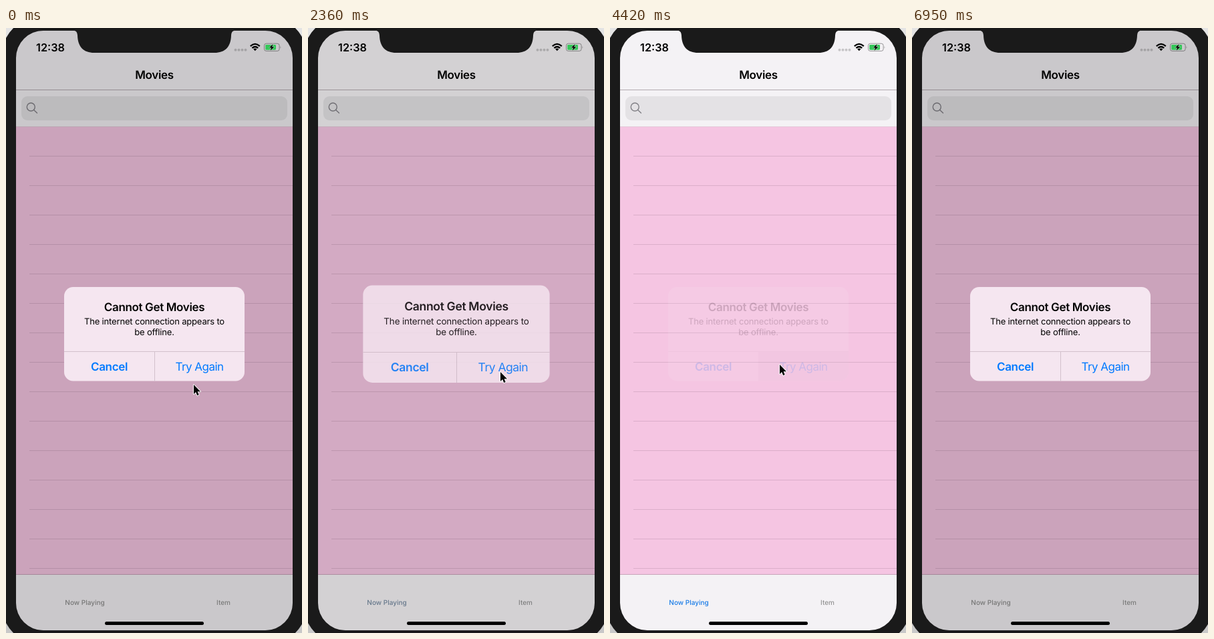
An HTML page that plays this animation: 443 by 904 pixels, repeating every 8000 ms.

```html
<!DOCTYPE html>
<html lang="en">
<head>
<meta charset="utf-8">
<title>Movies alert</title>
<style>
  html, body { margin: 0; width: 100%; height: 100%; overflow: hidden; background: #d8d8d8; }
  svg { display: block; width: 443px; height: 904px; }
  text { font-family: Inter, "Open Sans", sans-serif; text-rendering: geometricPrecision; }
  .mid { text-anchor: middle; }
  .bold { font-size: 17px; font-weight: 600; letter-spacing: -.35px; }
  .plain { font-size: 17px; letter-spacing: -.55px; }
  .message { font-size: 13px; letter-spacing: -.17px; }
  .tab { font-size: 10px; font-weight: 500; }
  .clock { font-size: 16.3px; font-weight: 600; }
  .link { fill: #007aff; }
</style>
</head>
<body>
<svg viewBox="0 0 443 904">
  <defs>
    <linearGradient id="desktop" x2="0" y2="1">
      <stop stop-color="#e4e4e4"/><stop offset="1" stop-color="#c8c8c8"/>
    </linearGradient>
    <clipPath id="screen"><rect x="15" y="4" width="414" height="896" rx="41"/></clipPath>
  </defs>

  <rect width="443" height="904" fill="url(#desktop)"/>
  <rect x="-7.5" y="-18.5" width="459" height="941" rx="63.5" fill="#1a1a1a"/>

  <g clip-path="url(#screen)">
    <rect x="15" y="4" width="414" height="896" fill="#fcfafd"/>
    <rect x="15" y="147" width="414" height="670" fill="#fdcbe9"/>
    <path id="rows" stroke="#e2b4d0"/>
    <path d="M15 92.5H429" stroke="#b9b0b6"/>
    <path d="M15 147.5H429" stroke="#ebd0e0"/>
    <path d="M15 816.5H429" stroke="#cfa9bf"/>
    <text class="mid bold" x="222" y="76">Movies</text>
    <rect x="23" y="102" width="398" height="36" rx="9" fill="#ebe9ec"/>
    <g fill="none" stroke="#85848a" stroke-width="1.4" stroke-linecap="round">
      <circle cx="37.3" cy="118" r="6"/><path d="M41.7 122.4L46.5 127"/>
    </g>
    <text class="mid tab" id="activeTab" x="118" y="862">Now Playing</text>
    <text class="mid tab" x="325.5" y="862" fill="#999">Item</text>
    <rect id="shade" x="15" y="4" width="414" height="896"/>

    <text class="clock" x="45" y="34.7">12:38</text>
    <g fill="#000" fill-opacity=".19">
      <circle cx="343.5" cy="32.7" r="2"/><circle cx="348.5" cy="32.7" r="2"/>
      <circle cx="353.5" cy="32.7" r="2"/><circle cx="358.5" cy="32.7" r="2"/>
    </g>
    <g fill="none" stroke="#000" stroke-width="2.3">
      <path d="M365.8 27.2Q372.8 20.6 379.8 27.2"/>
      <path d="M368.4 30Q372.8 26 377.2 30"/>
    </g>
    <path d="M370.2 31.4Q372.8 29.4 375.4 31.4L372.8 34.2Z"/>
    <rect x="386.5" y="23.2" width="22.6" height="11.2" rx="3" fill="none" stroke="#000" stroke-opacity=".38"/>
    <path d="M410.6 26.9q1.6 1.9 0 3.8z" fill-opacity=".4"/>
    <rect x="388.2" y="24.9" width="15.8" height="7.8" rx="1.4" fill="#34c759"/>
    <path d="M399.8 23.8L393.8 29.6H397L395.6 34L401.4 28.2H398.2Z" stroke="#e4efe6" stroke-width=".9" paint-order="stroke"/>
    <rect x="148" y="887" width="148" height="5" rx="2.5"/>

    <g id="alert">
      <rect x="87" y="387" width="270" height="140.5" rx="13.5" fill="#f5e6f0"/>
      <path d="M87 483.5H357M222.5 484V527.5" stroke="#d2c1cc"/>
      <path id="pressed" d="M222 484H357V514a13.5 13.5 0 0 1-13.5 13.5H222Z" fill="#e3d1dc"/>
      <text class="mid bold" x="222" y="423">Cannot Get Movies</text>
      <text class="mid message" x="222" y="443">The internet connection appears to</text>
      <text class="mid message" x="222" y="459">be offline.</text>
      <text class="mid bold link" x="154.5" y="511.5">Cancel</text>
      <text class="mid plain link" x="289.5" y="511.5">Try Again</text>
    </g>
  </g>

  <path d="M100 3.5C105 4 106.500 6 107 11C107.500 28 116 37 132 37H312C328 37 336.500 28 337 11C337.500 6 339 4 344 3.500Z" fill="#1a1a1a"/>
  <path id="cursor" d="M0 0V14L3.100 11.100L5.200 16L7.700 15L5.600 10.200H10Z" stroke="#fff" stroke-width="1.7" stroke-linejoin="round" paint-order="stroke"/>
</svg>
<script>
  const LOOP = 8000;
  const REFRESH = [0, 1190, 1340, 1480, 1630, 1780, 1920, 2070, 2360, 2510, 2650, 2800, 2950,
    3090, 3240, 3390, 3540, 3680, 3980, 4130, 4280, 4420, 4570, 4710, 4850, 5000, 5150];
  const TAPS = [
    { press: 1700, dismiss: 1810, present: 2220 },
    { press: 4100, dismiss: 4275, present: 4680 }
  ];
  // Pointer stops: time, x, y
  const PATH = [[1040, 281, 533], [1630, 288, 514], [2510, 288, 514],
    [3390, 237, 506], [3680, 254, 503]];
  const POINTER_GONE = 4700;

  const $ = id => document.getElementById(id);
  const mix = (a, b, p) => a + (b - a) * p;

  // Remaining distance of a critically damped spring after ms.
  function remaining(ms) {
    const x = 0.0228 * Math.max(0, ms);
    return (1 + x) * Math.exp(-x);
  }

  function alertState(t) {
    const tap = TAPS.filter(k => t >= k.press).pop();
    if (!tap) return { opacity: 1, scale: 1, pressed: false };
    if (t < tap.present)
      return { opacity: remaining(t - tap.dismiss), scale: 1, pressed: true };
    const left = remaining(t - tap.present);
    return { opacity: 1 - left, scale: 1 + 0.2 * left, pressed: false };
  }

  function pointerAt(t) {
    const next = PATH.findIndex(stop => stop[0] > t);
    if (next === 0) return PATH[0].slice(1);
    if (next < 0) return PATH[PATH.length - 1].slice(1);
    const [t0, x0, y0] = PATH[next - 1], [t1, x1, y1] = PATH[next];
    const p = (t - t0) / (t1 - t0), eased = p * p * (3 - 2 * p);
    return [mix(x0, x1, eased), mix(y0, y1, eased)];
  }

  function draw(t) {
    const { opacity, scale, pressed } = alertState(t);
    $('alert').setAttribute('opacity', opacity);
    $('alert').setAttribute('transform',
      `translate(222 457.25) scale(${scale}) translate(-222 -457.25)`);
    $('pressed').setAttribute('opacity', pressed ? 1 : 0);
    $('shade').setAttribute('opacity', 0.2 * opacity);
    const tint = [0, 122, 255].map(c => Math.round(mix(c, 146, opacity)));
    $('activeTab').setAttribute('fill', `rgb(${tint})`);
    $('cursor').setAttribute('transform', `translate(${pointerAt(t)})`);
    $('cursor').setAttribute('opacity', t < POINTER_GONE ? 1 : 0);
  }

  function tick() {
    const t = performance.now() % LOOP;
    draw(REFRESH.filter(r => r <= t).pop());
    requestAnimationFrame(tick);
  }

  $('rows').setAttribute('d',
    Array.from({ length: 15 }, (_, i) => `M35 ${191.5 + 44 * i}H429`).join(''));
  tick();
</script>
</body>
</html>
```
